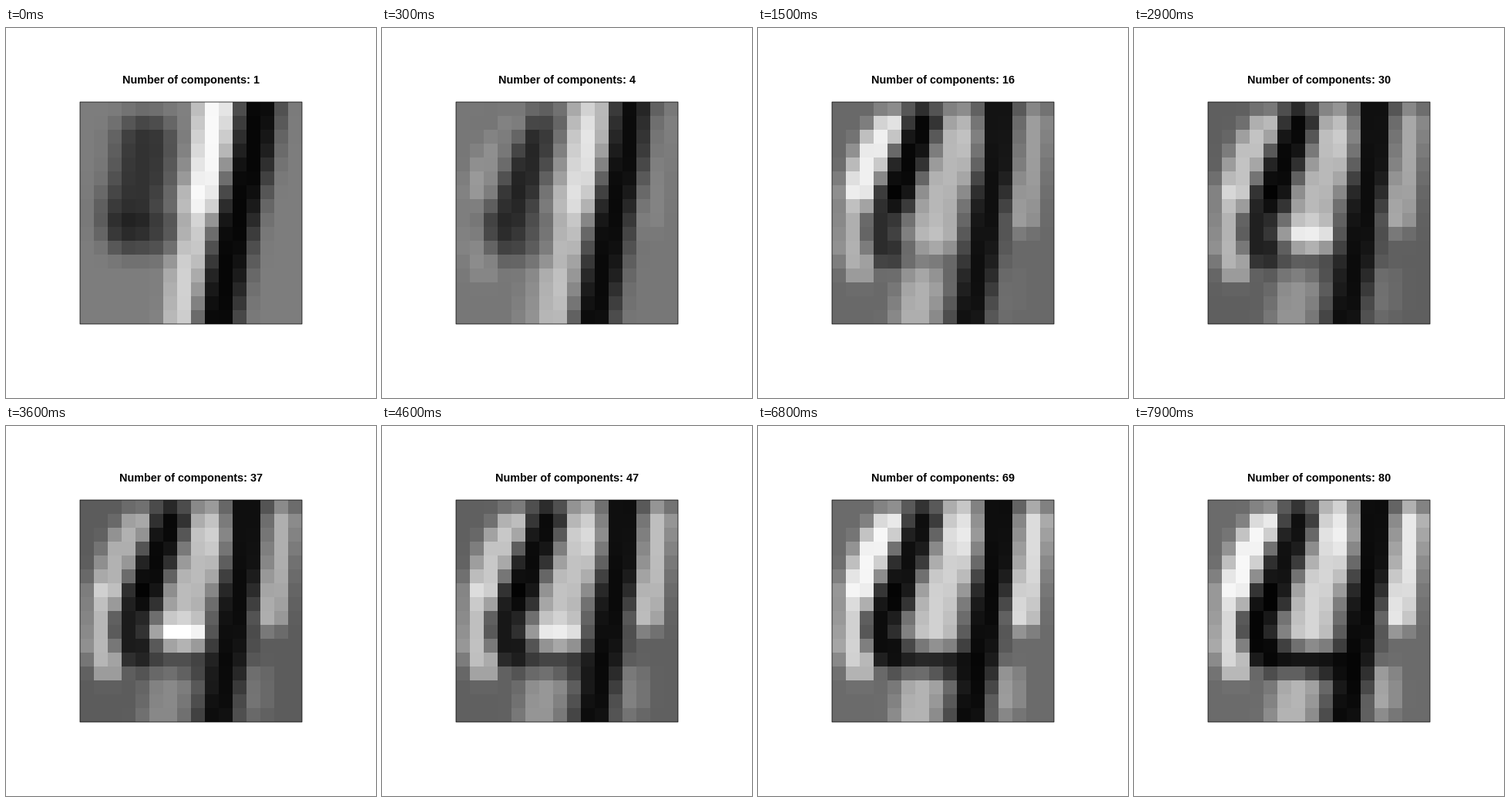
Recreate the animation shown at these times as a matplotlib script. Size 480x480 px, loop 8 s.

```python
import numpy as np
import matplotlib.pyplot as plt
from matplotlib.animation import FuncAnimation
from matplotlib.patches import Rectangle

SIZE, DPI, CELLS, COUNT = 480, 100, 16, 80
EDGE, SIDE = 96, 288
FIRST = 10  # by this count the blurred stroke has become a numeral
COL, ROW = np.meshgrid(np.arange(CELLS), np.arange(CELLS))


def brush(width, *points):
    """Soft mask of a polyline given in cell coordinates."""
    dist = np.full(COL.shape, np.inf)
    for (x0, y0), (x1, y1) in zip(points, points[1:]):
        dx, dy = x1 - x0, y1 - y0
        t = np.clip(((COL - x0) * dx + (ROW - y0) * dy) / (dx * dx + dy * dy), 0, 1)
        dist = np.minimum(dist, np.hypot(COL - x0 - t * dx, ROW - y0 - t * dy))
    return np.exp(-(dist / width) ** 3)


def paint(field, mask, tone, strength):
    return field + np.clip(strength, 0, 1) * mask * (tone - field)


# Blurred opening: one slanted light stroke between two dark ones
slant_top = brush(1.5, (9.3, 0), (9, 3), (8.5, 6.2))
slant_low = brush(1.4, (8.2, 7), (7.2, 12), (7, 15))
shadow = brush(1.6, (12.4, 0), (12, 3), (10.6, 9), (9.5, 15))
smudge = brush(2.2, (4.2, 2.5), (3.9, 5), (3.1, 7.5))
smear = brush(1.7, (3, 9), (6, 9))

# The numeral: light paper around dark pen strokes
paper_left = brush(1.3, (3.7, 1.4), (2.5, 3), (1.5, 5.6))
paper_low = brush(1.2, (1.2, 6.7), (1, 10), (1.5, 11.3))
crown = brush(1.4, (9, 0), (9, 2))
middle = brush(1.7, (8.8, 2), (8.4, 4), (7.3, 6), (6.9, 9))
paper_right = brush(1.2, (14, 1), (13.8, 3), (13.2, 7.8))
foot = brush(1.6, (6, 12.6), (5.5, 15))
heel = brush(1.2, (12, 12.5), (12, 14))
glow = brush(1.0, (6, 9), (7.5, 9))
arm = brush(1.25, (6, 1), (5.3, 3), (4.2, 6))
hook = brush(1.2, (3.9, 6.7), (2.9, 8.5), (3.4, 10.2))
bar = brush(1.1, (4, 10.9), (9, 11.3))
stem = brush(1.35, (11.5, 0), (11.4, 4), (10.7, 7.5), (10.2, 11), (9.4, 15))


def opening():
    field = np.full(COL.shape, 0.49)
    for mask, tone, strength in (
            (smudge, 0, 0.6), (smear, 0, 0.4), (slant_low, 1, 0.65),
            (slant_top, 1, 0.95), (shadow, 0, 0.95)):
        field = paint(field, mask, tone, strength)
    return field


def numeral(n):
    grow = np.clip((n - FIRST) / (COUNT - FIRST), 0, 1)
    # A glow passes mid-way and dims everything else in the grey range
    pulse = np.exp(-((n - 38) / 15) ** 2)
    dim = 1 - 0.45 * pulse
    field = np.full(COL.shape, 0.42 - 0.06 * pulse)
    for mask, tone, start, end in (
            (paper_left, 1, 0.95 * dim, 0.95 * dim), (paper_low, 1, 0.45, 0.75),
            (crown, 1, 0.1, 0.65), (middle, 1, 0.5, 0.72),
            (paper_right, 1, 0.3, 0.85), (foot, 1, 0.5 * dim, 0.5 * dim),
            (heel, 1, 0, 0.4), (glow, 1, pulse, pulse),
            (arm, 0, 0.95, 0.85), (hook, 0, 0.55, 0.95),
            (bar, 0, 0, 0.85), (stem, 0, 0.85, 0.93)):
        field = paint(field, mask, tone, start + (end - start) * grow)
    return field


def picture(n):
    t = min((n - 1) / (FIRST - 1), 1)
    return (1 - t) * opening() + t * numeral(n)


fig = plt.figure(figsize=(SIZE / DPI, SIZE / DPI), dpi=DPI, facecolor="white")
ax = fig.add_axes([0, 0, 1, 1])
img = ax.imshow(picture(1), cmap="gray", vmin=0, vmax=1, aspect="auto",
                interpolation="nearest",
                extent=(EDGE, EDGE + SIDE, EDGE + SIDE, EDGE))
ax.add_patch(Rectangle((EDGE, EDGE), SIDE, SIDE, fill=False, ec="black",
                       lw=0.75 * 72 / DPI, joinstyle="round", snap=False))
title = ax.text(SIZE / 2, 72, "", ha="center", va="baseline", color="black",
                family="Liberation Sans", weight="bold", size=14.4 * 72 / DPI)
ax.set(xlim=(0, SIZE), ylim=(SIZE, 0))
ax.axis("off")


def update(k):
    img.set_data(picture(k + 1))
    title.set_text(f"Number of components: {k + 1}")
    return img, title


anim = FuncAnimation(fig, update, frames=COUNT, interval=100,
                     repeat=True, repeat_delay=0)
plt.show()
```
